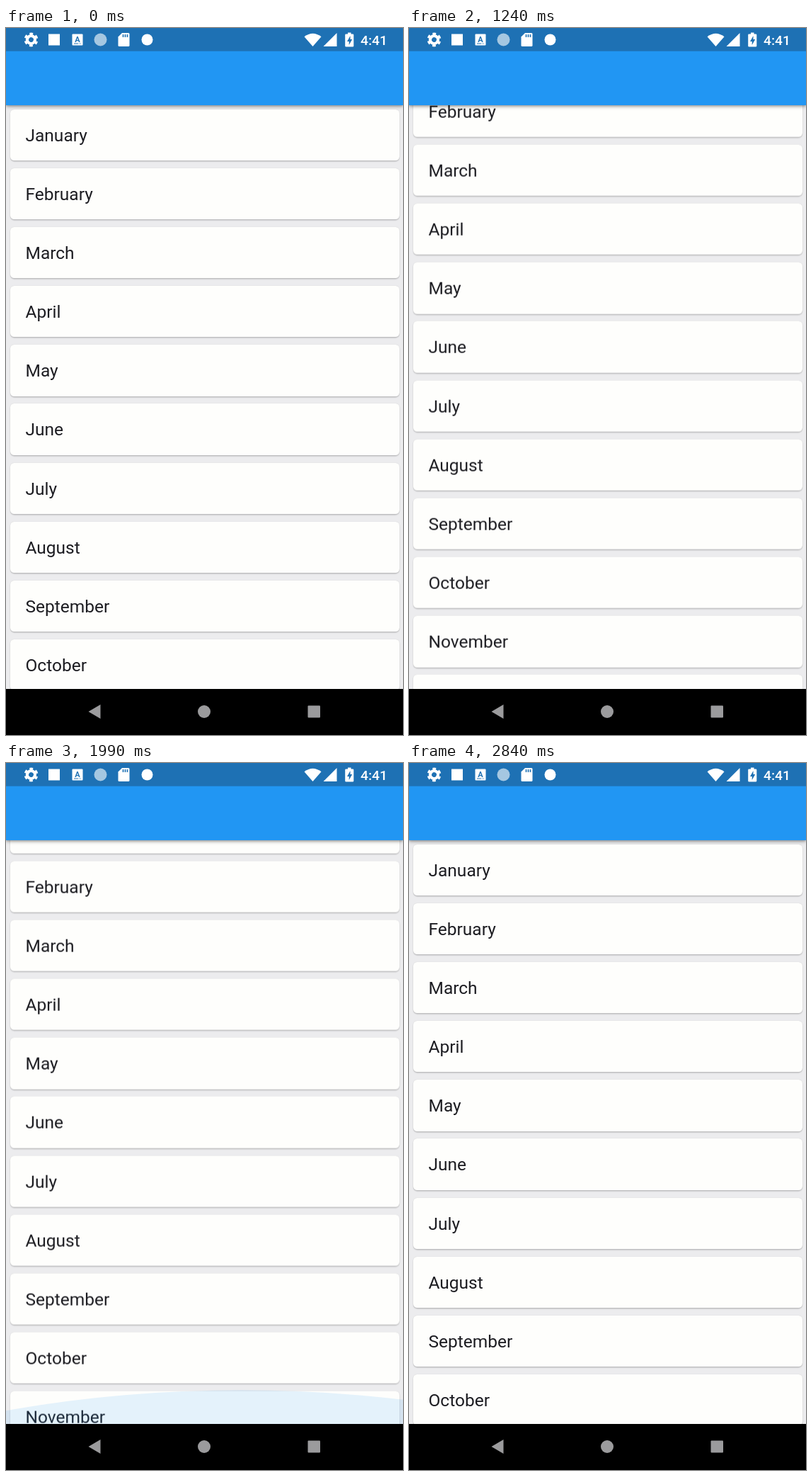
Recreate the animation shown at these times as an HTML page. Size 561 by 998 pixels, loop 2920 ms.

```html
<!DOCTYPE html>
<html lang="en">
<head>
<meta charset="utf-8">
<title>Month list</title>
<style>
  html, body { margin: 0; width: 100%; height: 100%; overflow: hidden; background: #000; }
  #stage { position: relative; width: 561px; height: 998px; overflow: hidden; font-family: Roboto, sans-serif; }
  #view { position: absolute; top: 109px; width: 561px; height: 824px; overflow: hidden; background: #ececee; }
  #list { position: absolute; top: 0; left: 0; width: 561px; will-change: transform; }
  .card {
    position: absolute; left: 5.5px; width: 550px; height: 72.3px; box-sizing: border-box;
    padding-left: 22px; border-radius: 5.5px; background: #fefefc; color: #1d1d22;
    font-size: 24.5px; line-height: 73px;
    box-shadow: 0 1.4px 1.6px rgba(0, 0, 0, .2), 0 0 1.4px rgba(0, 0, 0, .12);
  }
  #glow { position: absolute; top: 0; left: 0; }
  #bar {
    position: absolute; width: 561px; height: 109px; background: #2196f3;
    box-shadow: 0 2px 5px rgba(0, 0, 0, .3), 0 1px 3px rgba(0, 0, 0, .2);
  }
  #chrome { position: absolute; top: 0; left: 0; }
</style>
</head>
<body>
<div id="stage">
  <div id="view">
    <div id="list"></div>
    <svg id="glow" width="561" height="824" fill="#2196f3">
      <ellipse id="top" cx="330" rx="841.5"/>
      <ellipse id="bottom" cx="332" rx="841.5"/>
    </svg>
  </div>
  <div id="bar"></div>
  <svg id="chrome" width="561" height="998" fill="#fff">
    <rect width="561" height="32.7" fill="#1e71b4"/>
    <!-- notification icons -->
    <g fill="none" stroke="#fff" transform="rotate(30 35.5 16.5)">
      <circle cx="35.5" cy="16.5" r="5.5" stroke-width="4.2"/>
      <circle cx="35.5" cy="16.5" r="8.3" stroke-width="3.2" stroke-dasharray="4.6 4.09" stroke-dashoffset="2.3"/>
    </g>
    <rect x="60" y="8.5" width="16" height="16"/>
    <rect x="93.5" y="8.5" width="15" height="16" rx="1"/>
    <text x="101" y="20" font-size="11" font-weight="700" text-anchor="middle" fill="#1e71b4">A</text>
    <path d="M96 22h10" stroke="#1e71b4" stroke-dasharray="6 1 1 1"/>
    <circle cx="133.5" cy="16.5" r="9" fill="#a5c7e1"/>
    <path d="M164 7h9q1.500 0 1.500 1.500v16q0 1.500-1.500 1.500h-13q-1.500 0-1.500-1.500v-12z"/>
    <path d="M165.500 9v4M168.500 9v4M171.500 9v4" stroke="#1e71b4" stroke-width="1.600"/>
    <circle cx="199.500" cy="16.500" r="8"/>
    <!-- system icons -->
    <path d="M421.500 12.200Q433.500 3.200 445.500 12.200L433.500 26z"/>
    <path d="M467.500 7v19h-19z"/>
    <path d="M483 6.500h4.500v2h2.500q1.300 0 1.300 1.300v15.400q0 1.300-1.300 1.300h-9.500q-1.300 0-1.300-1.300v-15.400q0-1.300 1.300-1.300h2.500z"/>
    <path d="M486.500 11l-4.500 8h2.700v5l4.500-8h-2.700z" fill="#1e71b4"/>
    <text x="501" y="23.500" font-size="19.200" font-weight="500">4:41</text>
    <!-- navigation bar -->
    <rect y="933" width="561" height="65" fill="#000"/>
    <g fill="#9b9b9d">
      <path d="M116.500 965l17-10v20z"/>
      <circle cx="280" cy="965" r="9"/>
      <rect x="426.500" y="956.500" width="17.500" height="17" rx="1"/>
    </g>
  </svg>
</div>
<script>
  const LOOP = 2920, PITCH = 83.18, VIEW_H = 824;
  const RADIUS = 841.5, ARC_H = 112.7;
  const months = ['January', 'February', 'March', 'April', 'May', 'June', 'July',
    'August', 'September', 'October', 'November', 'December'];
  const byId = id => document.getElementById(id);
  const list = byId('list'), topGlow = byId('top'), bottomGlow = byId('bottom');

  months.forEach((name, i) => {
    const card = document.createElement('div');
    card.className = 'card';
    card.style.top = 5.5 + i * PITCH + 'px';
    card.textContent = name;
    list.append(card);
  });

  // Steps are [time, value]
  const scroll = [[980, 0], [1100, 40], [1240, 116], [1340, 153], [1430, 175],
    [1820, 175], [1860, 149], [1980, 66], [2090, 0]];
  const bottomPull = {
    size: [[1430, 0], [1460, .7], [1560, .8], [1700, .85]],
    alpha: [[1430, 0], [1460, .06], [1700, .23]],
    release: 1820
  };
  const topPull = {
    size: [[2090, 0], [2130, .6], [2190, .76], [2255, .83]],
    alpha: [[2090, 0], [2250, .19]],
    release: 2255
  };

  function at(steps, t) {
    if (t <= steps[0][0]) return steps[0][1];
    for (let i = 1; i < steps.length; i++) {
      const [t0, a] = steps[i - 1], [t1, b] = steps[i];
      if (t < t1) return a + (b - a) * (t - t0) / (t1 - t0);
    }
    return steps[steps.length - 1][1];
  }

  // Grows while pulled, then recedes over 600 ms with deceleration
  function drawGlow(el, pull, t, atBottom) {
    const left = 1 - Math.min(1, Math.max(0, (t - pull.release) / 580));
    const size = at(pull.size, t) * left * left;
    const cy = size * (ARC_H - RADIUS);
    el.setAttribute('cy', atBottom ? VIEW_H - cy : cy);
    el.setAttribute('ry', RADIUS * size);
    el.setAttribute('opacity', at(pull.alpha, t) * left * left);
  }

  function draw(now) {
    const t = now % LOOP;
    list.style.transform = `translateY(${-at(scroll, t)}px)`;
    drawGlow(topGlow, topPull, t, false);
    drawGlow(bottomGlow, bottomPull, t, true);
  }

  const start = performance.now();
  function tick() {
    draw(performance.now() - start);
    requestAnimationFrame(tick);
  }
  tick();
</script>
</body>
</html>
```
